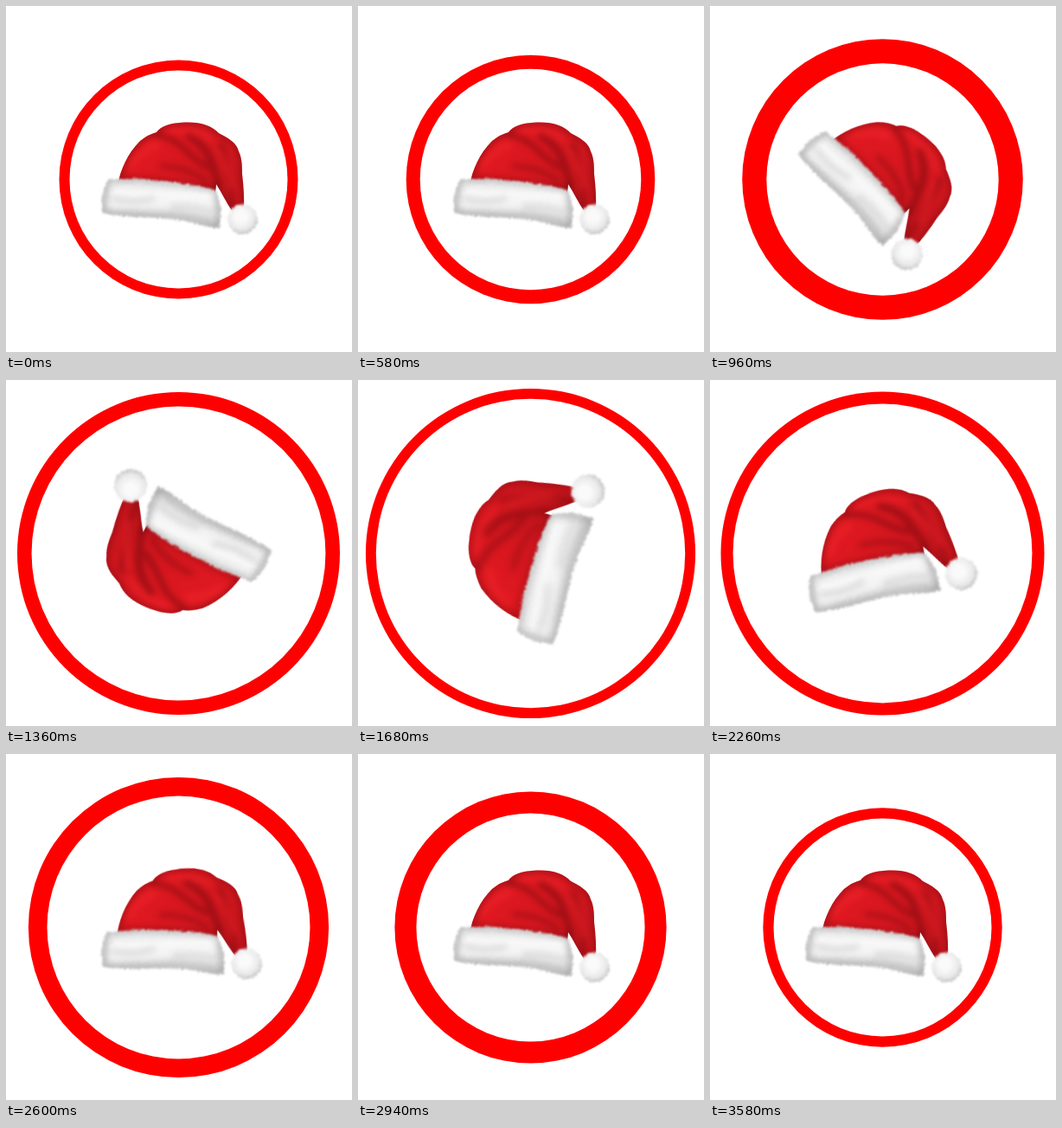
Recreate the animation shown at these times as an HTML page without scripts. Size 400x400 px, loop 3700 ms.

```html
<!DOCTYPE html>
<html lang="en">
<head>
<meta charset="utf-8">
<title>Santa hat</title>
<style>
  html, body { margin: 0; width: 100%; height: 100%; overflow: hidden; background: #fff; }
  svg { display: block; width: 100vw; height: 100vh; }
  filter { color-interpolation-filters: sRGB; }

  .outer, .inner, .spin, .swell { animation: 3700ms linear infinite; }
  .outer { fill: #f00; animation-name: outer; }
  .inner { fill: #fff; animation-name: inner; }
  .spin, .swell { transform-origin: 200px 200px; }
  .spin { animation-name: spin; }
  .swell { animation-name: swell; }

  @keyframes outer {
    0% { r: 138px; }
    8.1% { r: 139.5px; }
    14.6% { r: 142.5px; }
    20.5% { r: 149.5px; }
    24.3% { r: 157.5px; }
    25.9% { r: 162px; }
    29.2% { r: 174px; }
    32.4% { r: 181px; }
    36.8% { r: 186.5px; }
    43.8% { r: 190px; }
    51.3% { r: 192.5px; animation-timing-function: cubic-bezier(.37, 0, .63, 1); }
    98.6%, 100% { r: 138px; }
  }
  @keyframes inner {
    0% { r: 126px; }
    13.5% { r: 127px; }
    20.5% { r: 129.5px; }
    25.9% { r: 134px; }
    29.2% { r: 142px; }
    32.4% { r: 155px; }
    36.8% { r: 170px; }
    40.5% { r: 175.5px; }
    45.4% { r: 178.7px; }
    52.4% { r: 181px; animation-timing-function: cubic-bezier(.37, 0, .63, 1); }
    87%, 100% { r: 126px; }
  }
  @keyframes spin {
    0%, 17.3% { transform: rotate(0deg); animation-timing-function: cubic-bezier(.3, 0, .13, 1); }
    79.5%, 100% { transform: rotate(360deg); }
  }
  @keyframes swell {
    0%, 17.3% { transform: scale(1); animation-timing-function: cubic-bezier(.39, .58, .57, 1); }
    48.4% { transform: scale(1.12); animation-timing-function: cubic-bezier(.37, 0, .63, 1); }
    79.5%, 100% { transform: scale(1); }
  }
</style>
</head>
<body>
<svg viewBox="0 0 400 400">
  <defs>
    <linearGradient id="felt" x1="0" y1="0" x2="1" y2=".6">
      <stop offset="0" stop-color="#cf161d"/>
      <stop offset=".35" stop-color="#de1820"/>
      <stop offset=".7" stop-color="#d2161e"/>
      <stop offset="1" stop-color="#c8151c"/>
    </linearGradient>
    <linearGradient id="cuff" x1=".5" y1="0" x2=".42" y2="1">
      <stop offset="0" stop-color="#dedede"/>
      <stop offset=".3" stop-color="#f8f8f8"/>
      <stop offset=".65" stop-color="#f0f0f0"/>
      <stop offset="1" stop-color="#cccccc"/>
    </linearGradient>
    <radialGradient id="ball" cx=".45" cy=".4" r=".6">
      <stop offset=".3" stop-color="#fafafa"/>
      <stop offset=".75" stop-color="#e9e9e9"/>
      <stop offset="1" stop-color="#c6c6c6"/>
    </radialGradient>
    <filter id="soft" x="-50%" y="-50%" width="200%" height="200%"><feGaussianBlur stdDeviation="3.6"/></filter>
    <filter id="fur" x="-10%" y="-15%" width="120%" height="130%">
      <feTurbulence type="fractalNoise" baseFrequency=".4" numOctaves="2" seed="4"/>
      <feDisplacementMap in="SourceGraphic" scale="5" xChannelSelector="R" yChannelSelector="G"/>
      <feGaussianBlur stdDeviation=".9"/>
    </filter>
    <path id="body" d="M129 208C132 189 141 170 155 156Q165 148 174 146C181 136 198 134.500 211 134.500C226 134.500 239 139 246 147C256 152 267 158 269 168C273 176 273 186 273 194C275 210 275.500 224 275 238L262 238C254 226 249 215 243 206L242 216Z"/>
    <path id="band" d="M119 200C135 202 150 198 166 201C190 203 220 206 242 213C248 221 250 240 247 257C228 256 214 249 197 247C170 243 138 246 111 239C109 225 112 209 119 200Z"/>
    <clipPath id="bodyClip"><use href="#body"/></clipPath>
    <clipPath id="bandClip"><use href="#band"/></clipPath>
  </defs>

  <rect width="400" height="400" fill="#fff"/>
  <circle class="outer" cx="199.500" cy="200.500" r="138"/>
  <circle class="inner" cx="199.500" cy="200.500" r="126"/>

  <g class="spin"><g class="swell">
    <use href="#body" fill="url(#felt)"/>
    <g clip-path="url(#bodyClip)" fill="none" stroke-linecap="round">
      <g filter="url(#soft)">
        <use href="#body" stroke="#5c080d" stroke-width="4" opacity=".55"/>
        <g stroke="#7d0a10" opacity=".6">
          <path d="M174 149Q193 152 206 165T232 186" stroke-width="6"/>
          <path d="M212 151Q232 162 238 182T246 207" stroke-width="8"/>
          <path d="M249 160Q255 184 263 232" stroke-width="5"/>
          <path d="M180 185Q210 186 232 203" stroke-width="4"/>
          <path d="M132 198Q180 200 242 212" stroke-width="4"/>
        </g>
        <g stroke="#ee242b" opacity=".6">
          <path d="M145 183Q156 166 173 161" stroke-width="10"/>
          <path d="M190 143Q220 142 238 155" stroke-width="6"/>
          <path d="M245 166Q256 185 261 210" stroke-width="5"/>
        </g>
      </g>
    </g>

    <g filter="url(#fur)">
      <use href="#band" fill="url(#cuff)"/>
      <g clip-path="url(#bandClip)" fill="none">
        <g filter="url(#soft)" stroke="#989898">
          <use href="#band" stroke-width="4" opacity=".7"/>
          <path d="M112 238Q150 239 185 240T247 254" stroke-width="5" opacity=".5"/>
          <path d="M122 222Q150 229 172 222M190 232Q215 230 240 239" stroke-width="4" opacity=".4"/>
          <path d="M117 204L113 236M244 216L246 254" stroke-width="7" opacity=".45"/>
        </g>
      </g>
      <circle cx="273.500" cy="246.500" r="17.300" fill="url(#ball)"/>
    </g>
  </g></g>
</svg>
</body>
</html>
```
